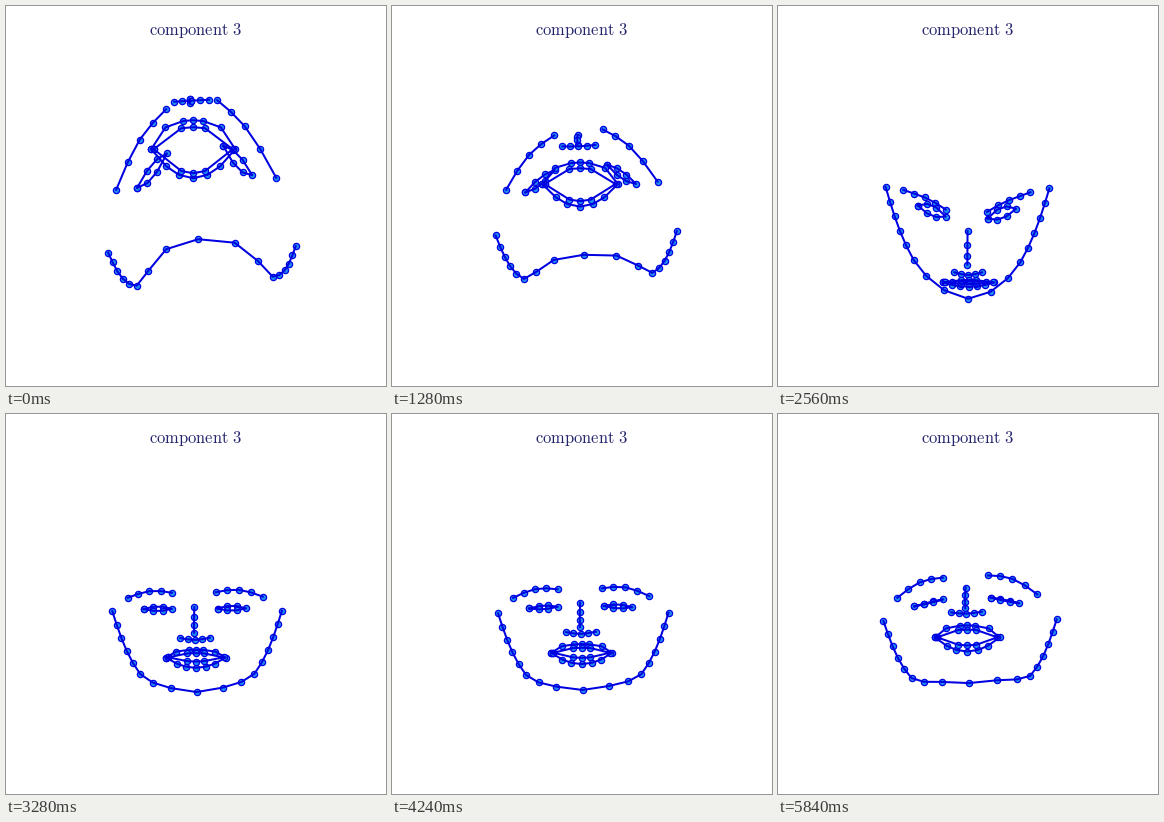
These frames come from a looping animation (380x380 px, 5.88 s). A matplotlib script:

```python
import numpy as np
import matplotlib.pyplot as plt
from matplotlib.animation import FuncAnimation

SIZE, DPI = 380, 100
FRAMES, STEP = 147, 40
LINE, FACE, INK = "#0000e1", "#1e8cf0", "#24246c"

plt.rcParams["mathtext.fontset"] = "cm"
fig = plt.figure(figsize=(SIZE / DPI, SIZE / DPI), dpi=DPI, facecolor="white")
ax = fig.add_axes([0, 0, 1, 1])
ax.set_xlim(0.3, SIZE + 0.3)
ax.set_ylim(SIZE + 0.3, 0.3)
ax.axis("off")
ax.text(143.6, 29.2, r"$\mathrm{component\ 3}$", fontsize=11.85, color=INK,
        ha="left", va="baseline")


def spline(xk, yk, x):
    """Monotone cubic through the keys; flat at every turning point."""
    xk, x = np.asarray(xk, float), np.atleast_1d(x)
    yk = np.asarray(yk, float).reshape(len(xk), -1)
    h = np.diff(xk)[:, None]
    d = np.diff(yk, axis=0) / h
    prod, total = d[:-1] * d[1:], d[:-1] + d[1:]
    m = np.zeros_like(yk)
    np.divide(2 * prod, total, out=m[1:-1], where=prod > 0)
    m[0], m[-1] = 1.5 * d[0] - m[1] / 2, 1.5 * d[-1] - m[-2] / 2
    i = np.clip(np.searchsorted(xk, x, side="right") - 1, 0, len(h) - 1)
    u = (x - xk[i])[:, None] / h[i]
    ease = u * u * (3 - 2 * u)
    return (yk[i] + ease * (yk[i + 1] - yk[i])
            + h[i] * u * (1 - u) * ((1 - u) * m[i] - u * m[i + 1]))


def curve(n, *keys, at=None):
    """n landmarks along a spline through a few key points."""
    if at is None:
        at = np.linspace(0, n - 1, len(keys))
    return spline(at, keys, np.arange(n))


def eye(left, right, lid):
    """Corners joined by an upper and a lower lid, `lid` off the axis."""
    t = np.array([0, 1, 2, 3, 2, 1, 0])[:, None] / 3
    pts = np.array(left) + t * np.subtract(right, left)
    pts[:, 1] += lid * np.array([0, 1, 1, 0, -0.8, -0.8, 0])
    return pts


def lip(cx, cy, half, up, down, top, bottom):
    """Elliptic arc above and parabola below, at relative widths."""
    a, b = np.array([-1, *top, 1]), np.array([*bottom[::-1], -1])
    x = np.r_[a, b]
    y = np.r_[-up * np.sqrt(1 - a * a), down * (1 - b * b)]
    return np.c_[cx + half * x, cy + y]


OUTER = dict(top=(-0.66, -0.24, 0, 0.24, 0.66),
             bottom=(-0.64, -0.34, 0, 0.34, 0.64))
INNER = dict(top=(-0.3, 0, 0.3), bottom=(-0.3, 0, 0.3))
JAW = (0, 5, 7, 8, 9, 11, 16)

# each part: its pose at weight 0 and at weight 1
poses = [
    # jaw
    (curve(17, (102.5, 247), (131, 280), (160.5, 243.5), (192.5, 233.5),
           (229, 237), (267, 271), (290, 240.5), at=JAW),
     curve(17, (107.5, 186), (135.5, 256), (166, 281.5), (190.5, 288.7),
           (214, 282.5), (244.5, 257.5), (273, 187), at=JAW)),
    # brows
    (curve(5, (110.5, 184), (134, 134), (160.5, 103.5)),
     curve(5, (124.5, 184.2), (146, 187.5), (167.5, 196.5))),
    (curve(5, (211.5, 94.5), (239, 120.5), (270.5, 172)),
     curve(5, (209.5, 198), (232, 189), (254, 185.5))),
    # nose
    (curve(4, (184.8, 95.5), (184, 92.5), (184.5, 97.5)),
     curve(4, (189.5, 216), (189.3, 234), (189.3, 247))),
    (curve(5, (168.5, 96), (185.3, 95), (203.5, 94)),
     curve(5, (176, 254), (190, 256.5), (204.3, 254))),
    # eyes
    (eye((131.5, 182), (161.3, 147.7), 7),
     eye((139.5, 198.5), (167.5, 206.2), -4.4)),
    (eye((217.5, 140), (246.5, 169.5), 7),
     eye((210.5, 207.5), (239, 200.5), -4.6)),
    # lips
    (lip(187.5, 143.5, 42, 29, 29, **OUTER),
     lip(190.7, 267, 27, 3, 6, **OUTER)),
    (lip(187.5, 143.5, 39.5, 22, 24, **INNER),
     lip(190.7, 266.8, 25, 0, -0.4, **INNER)),
]

# turning points of the weight: time in ms, value
TURNS = np.array([
    (0, 0), (160, -0.24), (940, 1.2), (1200, 0.24), (1600, 0.65),
    (2000, 0.24), (2600, 1.09), (3040, 0), (3320, 0.86), (3800, 0.46),
    (4080, 0.86), (4240, 0.775), (4440, 0.91), (4680, 0.46), (4960, 0.55),
    (5120, 0.24), (5280, 0.87), (5600, 0.41), (5840, 0.65)])
weights = spline(TURNS[:, 0], TURNS[:, 1], np.arange(FRAMES) * STEP).ravel()

# strokes run over the dots
dots, = ax.plot([], [], "o", ms=4.5, mfc=FACE, mec=LINE, mew=0.9,
                zorder=1, snap=False)
lines = [ax.plot([], [], color=LINE, lw=1.45, zorder=2)[0] for _ in poses]


def draw(n):
    w = weights[n]
    shapes = [(1 - w) * a + w * b for a, b in poses]
    for line, pts in zip(lines, shapes):
        line.set_data(*pts.T)
    dots.set_data(*np.vstack(shapes).T)
    return [dots, *lines]


anim = FuncAnimation(fig, draw, frames=FRAMES, interval=STEP,
                     repeat=True, repeat_delay=0, blit=False)
plt.show()
```
